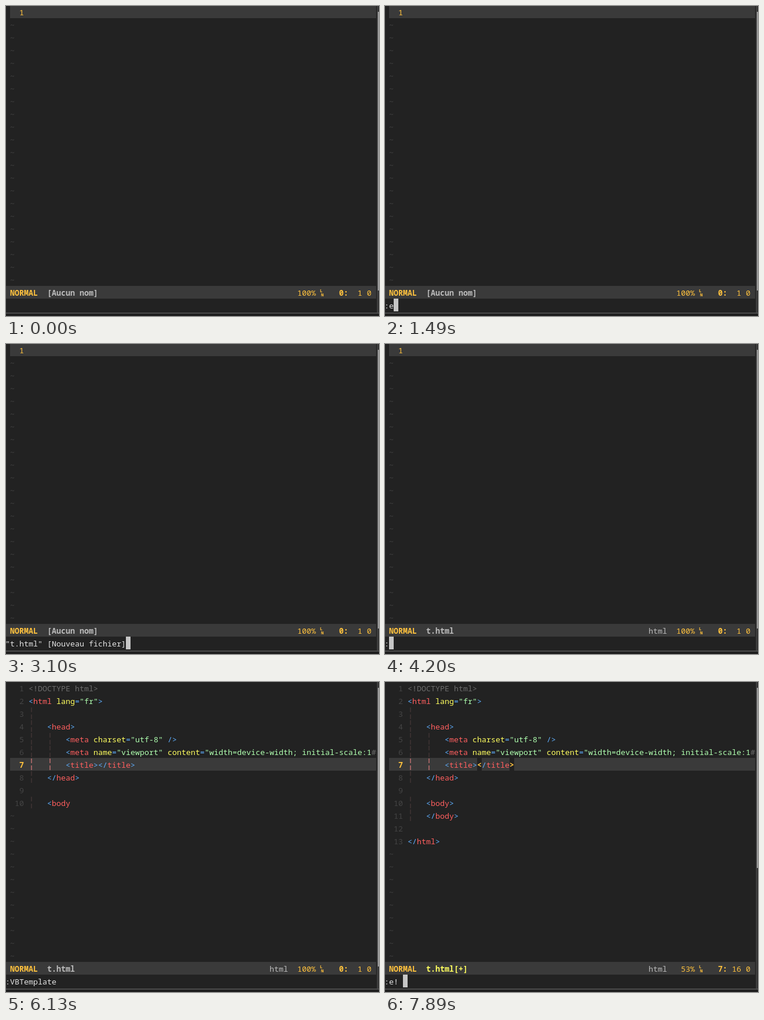
Recreate the animation shown at these times as an HTML page. Size 644 by 535 pixels, loop 8000 ms.

```html
<!DOCTYPE html>
<html lang="fr">
<head>
<meta charset="utf-8">
<title>Éditeur</title>
<style>
html, body { margin: 0; width: 100%; height: 100%; overflow: hidden; background: #222; }
svg { display: block; }
text { font: 13.3333px "Noto Sans Mono", "DejaVu Sans Mono", monospace; white-space: pre; }
.b { font-weight: 700; }
.s { font-size: 7.5px; font-weight: 700; }
</style>
</head>
<body>
<svg id="stage" width="644" height="535" viewBox="0 0 644 535"></svg>
<script>
const LOOP = 8000, CW = 8, CH = 22, STATUS = 22, CMD = 23;
const C = {
  bg: '#222222', bar: '#3a3a3a', gold: '#ffc23e', grey: '#bcbcbc', dim: '#444444',
  text: '#e4e4e4', cursor: '#c6c6c6', note: '#6c6c6c', tag: '#ff5f5f',
  mark: '#5fafff', attr: '#ffff5f', str: '#afffaf', guide: '#4e3c3c', hot: '#ff8787'
};
const PAGE = [
  '<!DOCTYPE html>',
  '<html lang="fr">',
  '',
  '    <head>',
  '        <meta charset="utf-8" />',
  '        <meta name="viewport" content="width=device-width; initial-scale:1',
  '        <title></title>',
  '    </head>',
  '',
  '    <body>',
  '    </body>',
  '',
  '</html>'
];

// Cursor positions are [column, row, character underneath].
const HOME = [5, 0];
const typed = cmd => ({ cmd, cur: [cmd.length, CMD] });
const STEPS = [
  [0, { cmd: '', cur: null, name: '[Aucun nom]', type: '', view: 'empty' }],
  [90, { cur: HOME }],
  [510, { cur: null }],
  [760, { cur: HOME }],
  [1150, { cur: null }],
  [1320, typed(':')],
  [1490, typed(':e')],
  [1610, typed(':e ')],
  [1810, typed(':e t')],
  [2020, typed(':e t.')],
  [2330, typed(':e t.h')],
  [2510, typed(':e t.ht')],
  [2710, typed(':e t.htm')],
  [2760, typed(':e t.html')],
  [3100, typed('"t.html" [Nouveau fichier]')],
  [3650, { cur: HOME, name: 't.html', type: 'html' }],
  [4200, typed(':')],
  [4540, typed(':V')],
  [4750, typed(':VB')],
  [4960, typed(':VBT')],
  [5170, typed(':VBTemplate')],
  [5460, { cur: [0, CMD, ':'] }],
  [6130, { cur: null, view: 'partial' }],
  [6180, { cur: [20, 6, '<'], view: 'full', name: 't.html[+]' }],
  [6910, { cur: null }],
  [7160, typed(':')],
  [7400, typed(':e')],
  [7670, typed(':e!')],
  [7890, typed(':e! ')]
];

const stage = document.getElementById('stage');
const colX = col => col * CW - 1;
const rowY = row => row * CH - 1;

function add(tag, attrs, content) {
  const el = document.createElementNS('http://www.w3.org/2000/svg', tag);
  for (const key in attrs) el.setAttribute(key, attrs[key]);
  if (content) el.textContent = content;
  stage.append(el);
}

const rect = (x, y, width, height, fill) => add('rect', { x, y, width, height, fill });
const write = (col, row, str, fill, cls = '') =>
  add('text', { x: colX(col), y: rowY(row) + 17, fill, class: cls }, str);
const cell = (col, row, fill) => rect(colX(col), rowY(row), CW, CH, fill);

function highlight(line, row) {
  const re = /(<!.*)|("[^"]*"?)|(<\/?|\/?>|=)|([a-z]+)/g;
  for (const m of line.matchAll(re)) {
    const isTag = '</'.includes(line[m.index - 1] || ' ');
    const fill = m[1] ? C.note : m[2] ? C.str : m[3] ? C.mark : isTag ? C.tag : C.attr;
    write(5 + m.index, row, m[0], fill);
  }
}

function guide(col, row, fill) {
  for (const dy of [1, 13]) rect(colX(col) + 4.5, rowY(row) + dy, 1, 8, fill);
}

function drawPage(full) {
  const lines = full ? PAGE : PAGE.slice(0, 9).concat('    <body');
  lines.forEach((line, row) => {
    const active = row === 6, num = String(row + 1);
    write(4 - num.length, row, num, active ? C.gold : C.dim, active ? 'b' : '');
    const depth = row === 2 ? 1 : line.search(/\S/) / 4;
    for (let i = 0; i < depth; i++) guide(5 + 4 * i, row, active ? C.hot : C.guide);
    highlight(line, row);
  });
  write(79, 5, '#', C.note);
  if (full) for (const [col, ch] of [[20, '<'], [27, '>']]) {
    cell(col, 6, C.bg);
    write(col, 6, ch, C.gold, 'b');
  }
  return lines.length;
}

function drawStatus(s, full) {
  rect(0, rowY(STATUS), 639, CH, C.bar);
  write(1, STATUS, 'NORMAL', C.gold, 'b');
  write(9, STATUS, s.name, full ? C.attr : C.grey, 'b');
  write(57, STATUS, s.type, C.grey);
  write(63, STATUS, full ? ' 53%' : '100%', C.gold);
  add('text', { x: 542, y: 494, fill: C.gold, class: 's' }, 'L');
  add('text', { x: 544, y: 501, fill: C.gold, class: 's' }, 'N');
  write(72, STATUS, full ? '7:' : '0:', C.gold, 'b');
  write(75, STATUS, full ? '16 0' : ' 1 0', C.gold);
}

function drawFrame(full) {
  rect(640, 0, 4, 529, '#303030');
  rect(641, 0, 1, 529, '#4a4a4a');
  rect(642, 10, 2, full ? 311 : 481, '#9c9c9c');
  rect(0, 529, 644, 2, '#4c4c4c');
  rect(0, 531, 644, 4, '#1e1e1e');
}

function draw(s) {
  stage.replaceChildren();
  const full = s.view === 'full', empty = s.view === 'empty';
  rect(0, 0, 644, 535, C.bg);
  rect(7, rowY(empty ? 0 : 6), 632, CH, C.bar);
  let used = 1;
  if (empty) write(3, 0, '1', C.gold);
  else used = drawPage(full);
  for (let row = used; row < STATUS; row++) write(1, row, '~', C.dim);
  drawStatus(s, full);
  write(0, CMD, s.cmd, C.text);
  if (s.cur) {
    const [col, row, ch] = s.cur;
    cell(col, row, C.cursor);
    if (ch) write(col, row, ch, C.bg, 'b');
  }
  drawFrame(full);
}

let shown = -1;
function tick() {
  const t = performance.now() % LOOP;
  const past = STEPS.filter(([at]) => at <= t);
  if (past.length !== shown) {
    shown = past.length;
    draw(Object.assign({}, ...past.map(([, change]) => change)));
  }
  requestAnimationFrame(tick);
}
tick();
</script>
</body>
</html>
```
